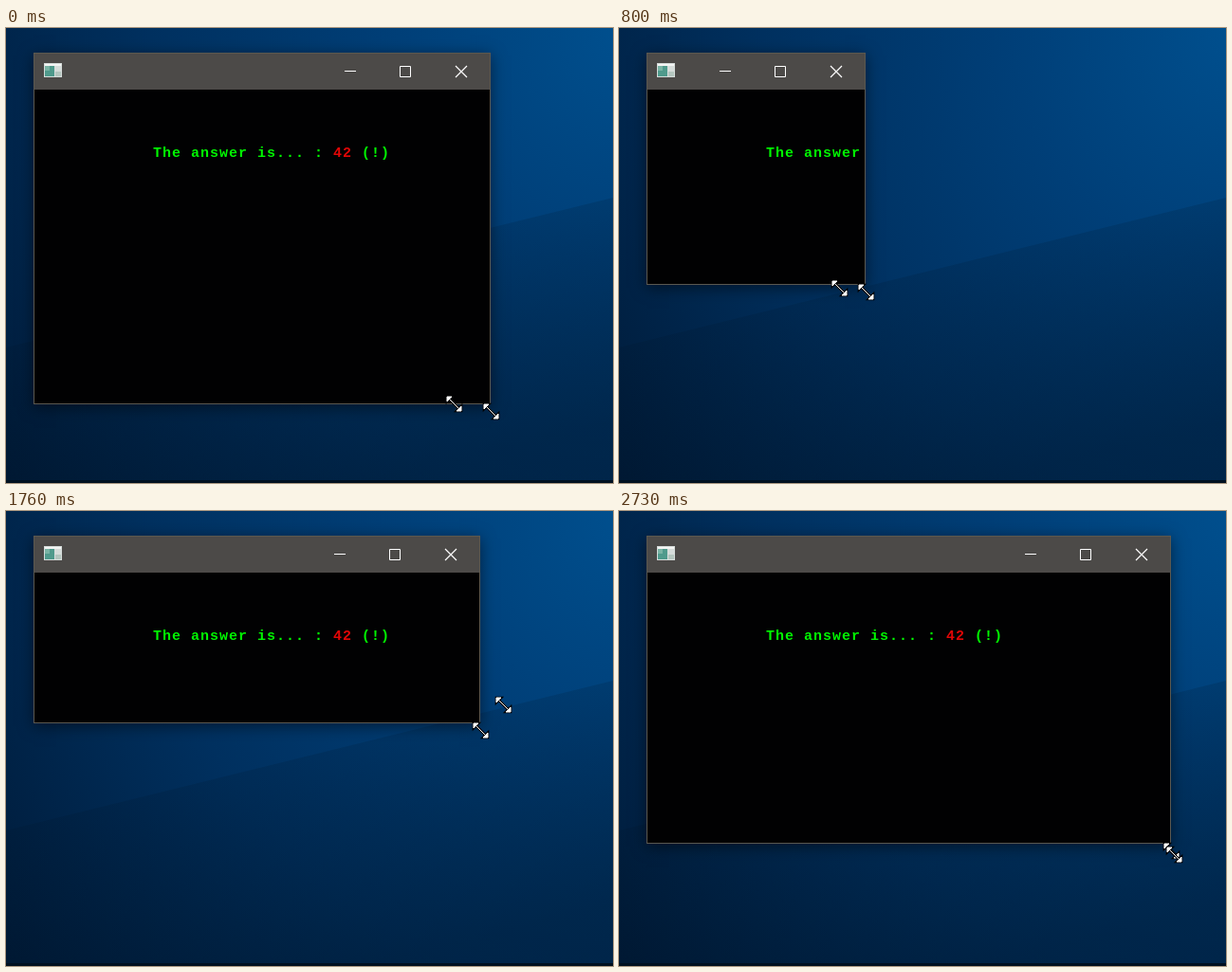
Recreate the animation shown at these times as an HTML page. Size 640 by 480 pixels, loop 2.76 s.

```html
<!DOCTYPE html>
<html lang="en">
<head>
<meta charset="utf-8">
<title>Resizing a console window</title>
<style>
  html, body { margin: 0; width: 100%; height: 100%; overflow: hidden; background: #001a36; }
  #stage { position: relative; width: 640px; height: 480px; overflow: hidden; }
  #stage > * { position: absolute; }
  #desk { left: 0; top: 0; }
  #win {
    left: 29px; top: 26px; box-sizing: border-box; overflow: hidden;
    border: 1px solid #5b5850; background: #010102;
    box-shadow: 0 3px 15px rgba(0, 0, 0, .5);
  }
  #bar { height: 38px; background: #4c4a48; }
  #icon { left: 40px; top: 37px; }
  #buttons { top: 39px; }
  #line {
    left: 155px; top: 124px; overflow: hidden; white-space: pre;
    font: bold 15px/17px "Liberation Mono", "Courier New", monospace;
    letter-spacing: 1px; color: #00f800;
  }
  #line b { color: #e00606; }
  .cursor { left: 0; top: 0; overflow: visible; }
</style>
</head>
<body>
<div id="stage">
  <svg id="desk" width="640" height="480">
    <defs>
      <radialGradient id="sky" gradientUnits="userSpaceOnUse" cx="660" cy="0" r="820">
        <stop offset="0" stop-color="#00508f"/>
        <stop offset=".3" stop-color="#003f78"/>
        <stop offset=".62" stop-color="#00305f"/>
        <stop offset="1" stop-color="#001a37"/>
      </radialGradient>
      <linearGradient id="shade" gradientUnits="userSpaceOnUse" x1="320" y1="255" x2="375" y2="480">
        <stop offset="0" stop-color="#001428" stop-opacity=".16"/>
        <stop offset="1" stop-color="#001428" stop-opacity=".42"/>
      </linearGradient>
    </defs>
    <path fill="url(#sky)" d="M0 0h640v480H0z"/>
    <path fill="url(#shade)" d="M0 337L640 179V480H0z"/>
    <path fill="#001020" d="M0 477h640v3H0z"/>
  </svg>

  <div id="win"><div id="bar"></div></div>

  <svg id="icon" width="20" height="16">
    <path fill="#d5dcda" d="M0 0h19v15H0z"/>
    <path fill="#f2f4f3" d="M1 1h17v2H1z"/>
    <path fill="#4f9a8c" d="M1 3h10v11H1z"/>
    <path fill="#79b3a4" d="M1 3h5v5H1z"/>
    <path fill="#b4c6bf" d="M12 9h6v5h-6z"/>
  </svg>

  <svg id="buttons" width="132" height="14" fill="none" stroke="#fff">
    <path d="M0 6.5h12M58.5 1.5h11v11h-11z"/>
    <path stroke-width="1.2" d="M117 1l12 12M129 1l-12 12"/>
  </svg>

  <div id="line">The answer is... : <b>42</b> (!)</div>

  <svg class="cursor" width="1" height="1">
    <g id="arrow">
      <path d="M-7.5-7.5h5L-7.5-2.5zM7.5 7.5h-5L7.5 2.5zM-6-6L6 6" fill="#000" stroke="#000" stroke-width="2.6"/>
      <path d="M-7.5-7.5h5L-7.5-2.5zM7.5 7.5h-5L7.5 2.5zM-6-6L6 6" fill="#fff" stroke="#fff" stroke-width="1"/>
    </g>
  </svg>
  <svg class="cursor" width="1" height="1"><use id="lead" href="#arrow"/></svg>
</div>

<script>
const LOOP = 2760, STEP = 100 / 3, LAG = 2 * STEP;
const LEFT = 29, TOP = 26, MIN_RIGHT = 180;
const TEXT_X = 155, CELL = 10, CELLS = 25, TEXT_BOTTOM = 140;

// Pointer path: [ms, x, y]
const path = [
  [-67, 511, 404], [0, 472, 396], [220, 410, 342], [500, 350, 292], [567, 331, 288],
  [800, 232, 274], [990, 170, 264], [1133, 170, 264], [1433, 424, 252], [1500, 448, 252],
  [1667, 490, 238], [1840, 538, 170], [1960, 527, 115], [2133, 527, 115],
  [2333, 557, 204], [2400, 560, 216], [2667, 582, 358], [2733, 585, 362]
];

const $ = id => document.getElementById(id);
const win = $("win"), buttons = $("buttons"), line = $("line"), arrow = $("arrow"), lead = $("lead");

const slope = (i, axis) => (path[i + 1][axis] - path[i][axis]) / (path[i + 1][0] - path[i][0]);

// Harmonic mean of the neighbouring slopes keeps the curve free of overshoot
function tangent(i, axis) {
  if (i === 0) return slope(0, axis);
  if (i === path.length - 1) return slope(i - 1, axis);
  const a = slope(i - 1, axis), b = slope(i, axis);
  return a * b <= 0 ? 0 : 2 * a * b / (a + b);
}

function pointer(ms) {
  let i = 0;
  while (i < path.length - 2 && ms > path[i + 1][0]) i++;
  const span = path[i + 1][0] - path[i][0];
  const u = Math.max(0, Math.min(1, (ms - path[i][0]) / span)), v = 1 - u;
  return [1, 2].map(axis => Math.round(
    v * v * (1 + 2 * u) * path[i][axis] + u * u * (3 - 2 * u) * path[i + 1][axis] +
    span * u * v * (v * tangent(i, axis) - u * tangent(i + 1, axis))
  ));
}

const place = (el, [x, y]) => el.setAttribute("transform", `translate(${x + .5} ${y + .5})`);

function draw(ms) {
  const t = Math.floor((ms % LOOP + 7) / STEP) * STEP;
  const now = pointer(t), held = pointer(t - LAG);
  const right = Math.max(MIN_RIGHT, held[0] - 1), bottom = held[1] - 8;

  win.style.width = right - LEFT + 1 + "px";
  win.style.height = bottom - TOP + 1 + "px";
  buttons.style.left = right - 153 + "px";

  const cells = Math.min(CELLS, Math.floor((right - TEXT_X) / CELL));
  line.style.width = cells * CELL + "px";
  line.style.visibility = bottom < TEXT_BOTTOM ? "hidden" : "visible";

  place(arrow, held);
  // The second arrow is nested in the first one's transform
  lead.setAttribute("transform", `translate(${now[0] - held[0]} ${now[1] - held[1]})`);
}

const start = performance.now();
function tick() {
  draw(performance.now() - start);
  requestAnimationFrame(tick);
}
draw(0);
tick();
</script>
</body>
</html>
```
